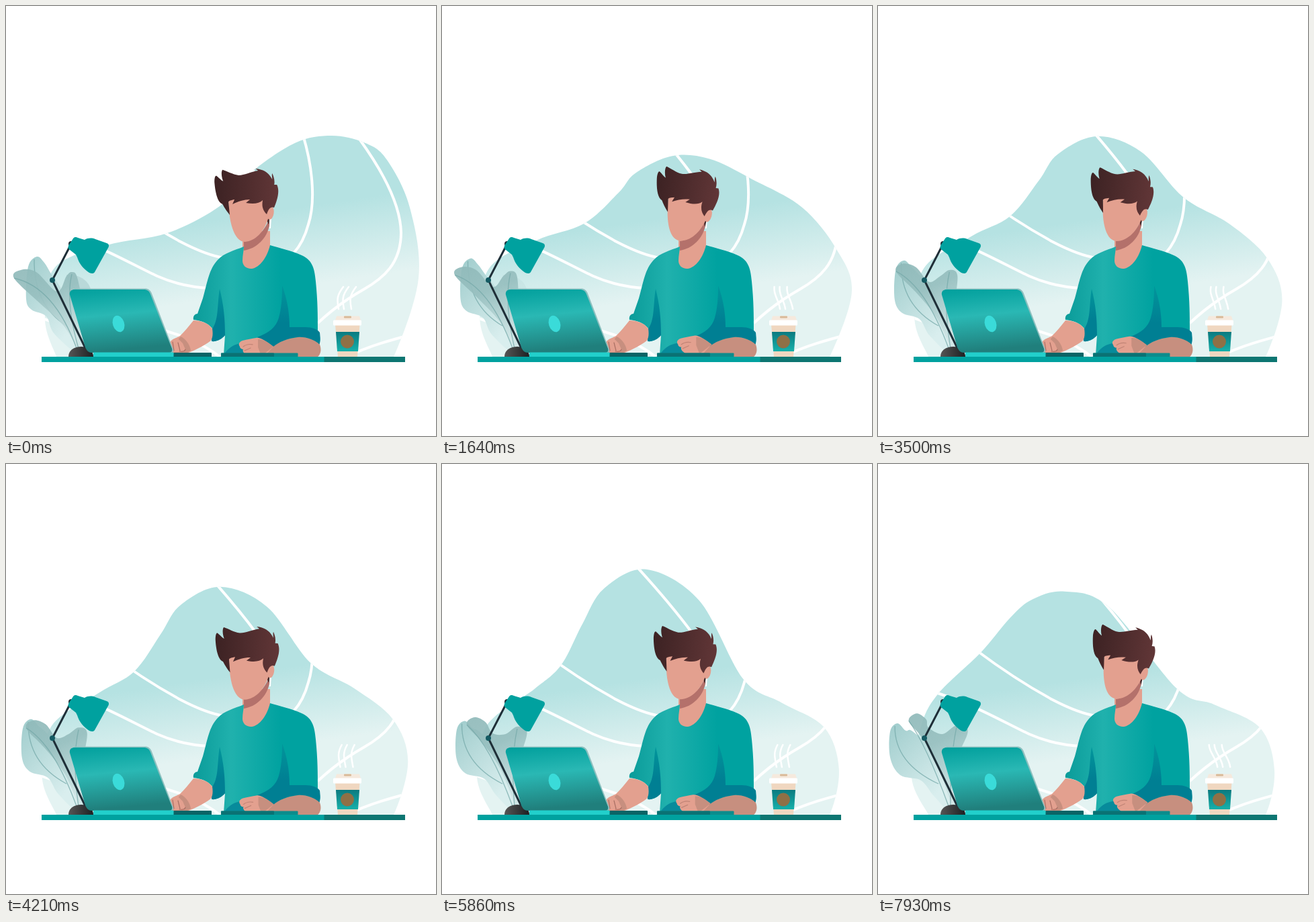
An HTML page for the animation above (8000 ms loop, 640 by 640 pixels).

```html
<!DOCTYPE html>
<html lang="en">
<head>
<meta charset="utf-8">
<title>Working at a desk</title>
<style>
  html, body { margin: 0; width: 100%; height: 100%; overflow: hidden; background: #fff; }
  svg { display: block; width: 100vw; height: 100vh; }
  .line { fill: none; stroke: #fff; stroke-width: 4; }
  .skin { fill: #e3a08f; }
  .shade { fill: #c78f7f; }
  .teal { fill: #00a19f; }
  .rib { fill: none; stroke: #74a9a9; stroke-width: 1.3; opacity: .75; }
  .crease { fill: none; stroke: #a96f64; stroke-width: 1.2; stroke-linecap: round; }
</style>
</head>
<body>
<svg viewBox="0 0 640 640">
  <defs>
    <linearGradient id="sky" gradientUnits="userSpaceOnUse" x1="350" y1="312" x2="367" y2="428">
      <stop stop-color="#b5e2e2"/><stop offset="1" stop-color="#e4f3f2"/>
    </linearGradient>
    <linearGradient id="paleTone" x1="0" y1="0" x2=".7" y2="1">
      <stop stop-color="#9fcccc"/><stop offset=".9" stop-color="#d9eeee"/>
    </linearGradient>
    <linearGradient id="darkTone" x1="0" y1="0" x2=".3" y2="1">
      <stop stop-color="#8fb9b9"/><stop offset=".4" stop-color="#97bfbf"/><stop offset="1" stop-color="#cfe5e5"/>
    </linearGradient>
    <linearGradient id="hairTone">
      <stop stop-color="#3c2223"/><stop offset="1" stop-color="#613637"/>
    </linearGradient>
    <linearGradient id="shirtTone" gradientUnits="userSpaceOnUse" x1="280" y1="0" x2="465" y2="0">
      <stop stop-color="#0b9c9a"/><stop offset=".3" stop-color="#20b1ad"/><stop offset=".7" stop-color="#00a2a0"/>
    </linearGradient>
    <linearGradient id="foldTone" x1="0" y1="0" x2="0" y2="1">
      <stop stop-color="#02969b"/><stop offset=".6" stop-color="#007f93"/>
    </linearGradient>
    <linearGradient id="screenTone" x1="0" y1="0" x2=".15" y2="1">
      <stop stop-color="#009f9c"/><stop offset=".45" stop-color="#2ab8b4"/><stop offset="1" stop-color="#207f7c"/>
    </linearGradient>
    <linearGradient id="baseTone">
      <stop stop-color="#555"/><stop offset="1" stop-color="#1d2022"/>
    </linearGradient>
    <linearGradient id="sleeveTone" x1="0" y1="0" x2="0" y2="1">
      <stop stop-color="#0b7a80"/><stop offset="1" stop-color="#16b0aa"/>
    </linearGradient>
    <clipPath id="blobClip"><path id="clipShape"/></clipPath>
  </defs>

  <path id="blob" fill="url(#sky)"/>
  <g class="line" clip-path="url(#blobClip)">
    <path d="M290 153C320 186 346 216 372 251"/>
    <path d="M442 192C458 245 460 295 450 325C446 340 438 357 428 368"/>
    <path d="M526 198C560 245 587 295 588 337C588 383 562 405 532 422C502 439 482 455 464 472"/>
    <path d="M82 339C140 356 190 386 225 402C250 413 275 419 305 420"/>
    <path d="M146 277C190 310 225 332 260 351C285 364 305 372 325 375"/>
    <path d="M518 517C545 505 570 498 604 489"/>
    <path d="M40 460C65 468 90 478 120 490"/>
    <path d="M215 478C250 485 290 500 318 522"/>
  </g>

  <path id="sideLeaf" fill="#b9d9d9" d="M90 400C105 399 123 405 127 425L110 500Z"/>
  <path id="pale" fill="url(#paleTone)"/>
  <path id="paleRib" class="rib"/>
  <path id="dark" fill="url(#darkTone)" opacity=".92"/>
  <path id="darkRib" class="rib"/>

  <!-- lamp -->
  <path d="M93 522C93 512 102 507 112 507S130 513 130 522Z" fill="url(#baseTone)"/>
  <path d="M97 354L69 408L118 509" fill="none" stroke="#1f2f38" stroke-width="3"/>
  <circle cx="97" cy="354" r="4" fill="#1f2f38"/>
  <circle cx="69" cy="408" r="4" fill="#155b63"/>
  <path class="teal" d="M107 345L117 348C122 345 128 345 133 347L150 353C153 354 154 357 152 360L132 396C130 399 127 398 124 397C115 391 109 384 106 374L104 370L95 363C92 361 92 358 94 355L100 346C102 343 105 344 107 345Z"/>

  <!-- neck and shirt -->
  <path class="skin" d="M352 335H393V362L388 392H352Z"/>
  <path d="M354 350C370 348 384 338 392 316V327C388 346 373 361 354 364Z" fill="#b4716b"/>
  <path d="M394 316L393 331" stroke="#fff" stroke-width="2"/>
  <path fill="url(#shirtTone)" d="M354 358C340 364 325 367 315 378C302 392 300 410 293 435L285 458C281 458 278 462 279 467C289 468 300 471 307 480L306 499C314 500 322 495 326 490L324 519H440L467 500C468 494 467 488 464 483C464 460 464 440 461 410C459 388 455 378 440 371C425 364 406 360 393 356C389 373 378 390 365 391C357 391 352 386 352 379C352 371 354 364 354 358Z"/>
  <path fill="url(#foldTone)" d="M318 421C314 445 317 468 306 482V499C314 500 322 495 326 490C326 465 324 445 318 421Z"/>
  <path fill="url(#foldTone)" d="M411 416C418 435 422 455 422 478H446C455 478 464 481 467 486C468 495 468 501 466 505C458 496 446 492 435 493C420 494 405 500 398 508L374 493C392 486 402 478 406 464C410 450 411 434 411 416Z"/>
  <path d="M324 519C332 507 342 502 356 501L370 519Z" fill="#078b9b"/>

  <!-- left forearm -->
  <path class="skin" d="M279 468C272 477 265 485 259 491C253 494 246 496 244 503V516H272C284 511 296 505 305 498C308 494 308 486 307 480C300 471 289 468 279 468Z"/>
  <path class="shade" d="M260 492C267 495 274 504 275 513L270 516H245V508Z"/>
  <path class="skin" d="M244 501C247 495 252 494 257 496L263 502L267 511L264 515H246Z"/>
  <path class="crease" d="M248 500L250 513M256 501L259 513M258 514C263 515 266 514 267 511"/>

  <!-- right forearm -->
  <path class="shade" d="M467 504C458 496 446 492 434 493C418 495 406 500 398 507L372 498L371 517H434V523H463C470 518 469 509 467 504Z"/>
  <g id="hand">
    <path class="skin" d="M348 507C345 503 347 500 352 498C359 496 366 495 372 494C379 493 385 498 398 507L385 521H360C355 518 351 514 353 511C350 511 348 509 348 507Z"/>
    <path class="shade" d="M375 496V508L380 521L398 507C389 500 384 496 375 496Z"/>
    <path class="crease" opacity=".6" d="M353 507C357 504 362 503 367 504M355 513L364 509"/>
  </g>

  <!-- head -->
  <g id="head">
    <path d="M386 300L393 300L391 325C388 321 387 312 386 300Z" fill="#3f2425"/>
    <path class="skin" d="M331 286C331 320 339 351 356 351C371 350 384 336 390 317L395 286Z"/>
    <ellipse class="skin" cx="393.5" cy="308" rx="5" ry="10" transform="rotate(8 393.5 308)"/>
    <path fill="url(#hairTone)" d="M310 262C310 256 311 252 313 253C316 255 319 259 323 261C320 254 320 246 322 244C329 246 337 251 346 252C355 252 363 247 375 245L371 242C383 243 391 248 396 258C396 254 395 252 396 249C399 255 400 261 399 266L403 266C408 276 403 290 399 300C394 298 391 301 388 310C383 305 380 299 382 289C377 294 368 295 357 293L363 288C354 288 345 291 337 295L340 288C335 289 331 290 331 292L333 311C327 304 325 300 322 295C314 292 311 275 310 262Z"/>
  </g>

  <!-- laptop -->
  <path d="M101 420.5H207C212 420.5 215 423 217 428L249 511C250 515 248 516 245 516H200Z" fill="#8cc0bf"/>
  <path fill="url(#screenTone)" d="M95 430C94 425 97 422 102 422H205C210 422 213 424 215 429L247 510C248 514 246 516 243 516H128C123 516 120 513 118 508Z"/>
  <ellipse cx="167.5" cy="473" rx="8.5" ry="12.5" transform="rotate(-18 167.5 473)" fill="#3adbd9"/>

  <!-- desk -->
  <rect x="249" y="516" width="57" height="7" rx="1" fill="#0a6466"/>
  <rect x="130" y="515.5" width="119.5" height="7" rx="1" fill="#22cfcb"/>
  <rect x="320" y="516.5" width="114.5" height="6" rx="1" fill="#0b8c8c"/>
  <rect x="320" y="516.5" width="79" height="6" rx="1" fill="#0a7274"/>

  <!-- cup -->
  <path d="M490 474H526.5L523 522H494Z" fill="#f0d7c0"/>
  <path d="M491 485H526L524 514H493Z" fill="url(#sleeveTone)"/>
  <circle cx="508" cy="499.5" r="10" fill="#8f7046"/>
  <path d="M490 468L492 461.5H526L528 468Z" fill="#f5e9dd"/>
  <rect x="503" y="461.5" width="11" height="3" rx="1" fill="#d9b998"/>
  <rect x="487" y="467.5" width="42" height="8" rx="1.5" fill="#fff"/>
  <path id="steam" class="line" style="stroke-width:2.5;stroke-linecap:round"/>

  <rect class="teal" x="53" y="522" width="421" height="8"/>
  <rect x="473.5" y="522" width="120.5" height="8" fill="#0d7672"/>
</svg>
<script>
const LOOP = 8000;
const SWING = 5000;
const $ = id => document.getElementById(id);
const setPath = (id, d) => $(id).setAttribute('d', d);
const points = text => text.split(' ').map(pair => pair.split(',').map(Number));
const mix = (a, b, k) => a.map((p, i) => p.map((v, j) => v + (b[i][j] - v) * k));

// The hill's outline morphs at a steady pace between four poses.
const hill = [
  { at: 0, shape: points('150,356 240,338 318,298 362,250 430,204 485,193 535,204 567,229 601,300 614,405') },
  { at: 1400, shape: points('140,350 214,325 266,280 291,252 345,227 399,229 460,253 537,296 588,360 611,424') },
  { at: 6035, shape: points('138,334 176,298 207,236 239,183 302,154 382,202 448,323 505,358 568,393 590,455') },
  { at: LOOP, shape: points('88,342 152,280 197,228 230,202 277,191 342,213 445,335 500,358 568,392 590,455') }
];

// Each leaf drifts from one pose to the other over the loop.
const pale = {
  from: points('33,388 46,373 57,382 68,400 82,420 104,460 108,515 72,488 60,462 38,452 30,436'),
  to: points('18,398 29,386 41,397 50,397 75,420 104,460 108,515 84,495 64,471 33,463 18,437')
};
const dark = {
  from: points('12,405 22,393 45,396 76,425 90,402 98,396 106,404 114,450 114,515 85,475 50,442'),
  to: points('46,382 58,371 72,380 75,392 96,402 117,389 134,398 114,450 114,515 89,448 64,405')
};

// Smooth cubic path through points; `tail` steers the end of an open one.
function spline(pts, tail) {
  const n = pts.length;
  const at = i => tail ? (i < 0 ? pts[0] : i >= n ? tail : pts[i]) : pts[(i + n) % n];
  let d = 'M' + pts[0];
  for (let i = 0; i < (tail ? n - 1 : n); i++) {
    const [p, a, b, q] = [at(i - 1), at(i), at(i + 1), at(i + 2)];
    const c1 = a.map((v, j) => v + (b[j] - p[j]) / 6);
    const c2 = b.map((v, j) => v - (q[j] - a[j]) / 6);
    d += `C${c1} ${c2} ${b}`;
  }
  return d + 'Z';
}

function drawHill(t) {
  const next = hill.findIndex(pose => pose.at > t);
  const [a, b] = [hill[next - 1], hill[next]];
  const ridge = mix(a.shape, b.shape, (t - a.at) / (b.at - a.at));
  const drift = t / 1000;
  const d = spline([[75, 522], [58 - drift, 467], [72 - drift, 390], ...ridge, [577, 522]], [545, 560]);
  setPath('blob', d);
  setPath('clipShape', d);
}

function drawPlant(t) {
  const back = mix(pale.from, pale.to, t / LOOP);
  const front = mix(dark.from, dark.to, t / LOOP);
  const [x, y] = back[1];
  const [crownX, crownY] = front[5];
  setPath('pale', spline(back));
  setPath('dark', spline(front));
  setPath('paleRib', `M${x - 4} ${y + 4}Q${x - 5} 445 90 476`);
  setPath('darkRib', `M${front[0]}Q72 418 106 512M${crownX} ${crownY + 3}Q${crownX - 10} 440 108 510`);
  $('sideLeaf').setAttribute('opacity', Math.max(0, 1 - t / 2500));
}

function drawSteam(t) {
  const s = Math.cos(2 * Math.PI * t / SWING);
  setPath('steam', [497, 505, 516].map(x =>
    `M${x + 5 * s} 418C${x - 4} 430 ${x + 1 - 6 * s} 436 ${x + 3.5 - 5.5 * s} 451`).join(''));
}

function drawPerson(t) {
  const fromRest = Math.abs((t + 2700) % SWING - SWING / 2);
  const k = .5 - .5 * Math.cos(Math.PI * Math.min(1, fromRest / 2200));
  $('head').setAttribute('transform', `translate(0 ${-1.5 * k}) rotate(${8.3 * k} 357 332)`);
  $('hand').setAttribute('transform', `translate(${3.5 * k} ${-3.5 * k})`);
}

function frame() {
  const t = performance.now() % LOOP;
  [drawHill, drawPlant, drawSteam, drawPerson].forEach(draw => draw(t));
  requestAnimationFrame(frame);
}
frame();
</script>
</body>
</html>
```
